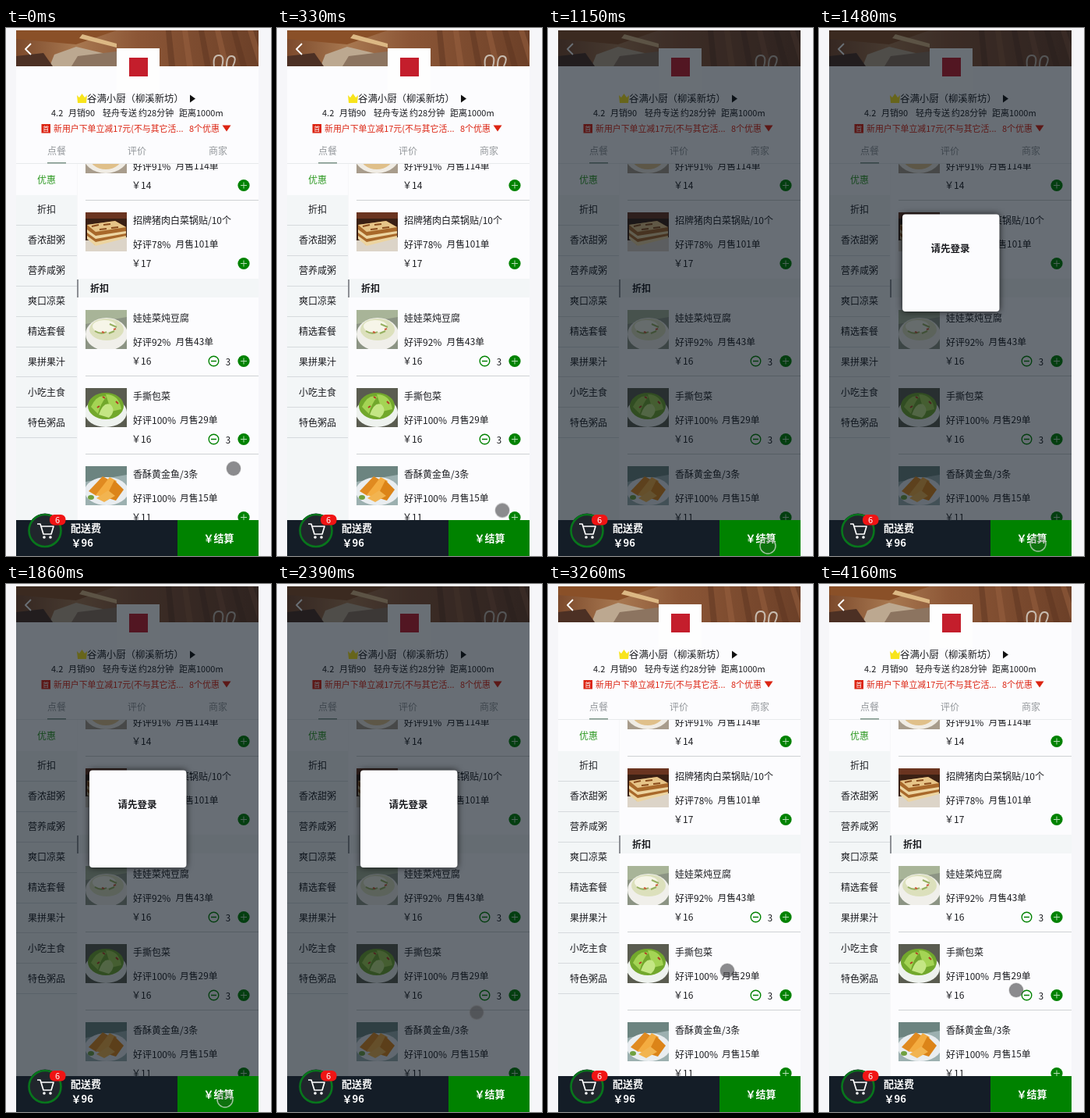
An HTML page that plays this animation: 340x676 px, repeating every 4200 ms.

```html
<!DOCTYPE html>
<html lang="zh-CN">
<head>
<meta charset="utf-8">
<title>点餐</title>
<style>
  html, body { margin: 0; width: 100%; height: 100%; overflow: hidden; background: #f6f6f9; }
  svg { display: block; }
  text { font-family: "Noto Sans CJK SC", "Noto Sans CJK", "Noto Sans", sans-serif; white-space: pre; }
  #popup { filter: drop-shadow(0 0 4px rgba(0, 0, 0, .75)); }
</style>
</head>
<body>
<svg id="stage" width="340" height="676" viewBox="0 0 340 676"></svg>
<script>
const LOOP = 4200;
const INK = '#1b1c20', GREEN = '#008200', NAVY = '#141d27', RED = '#dc2412';
const PAGE = '#f6f6f9', PALE = '#f3f6f7', WHITE = '#fcfcfe', LINE = '#d6dadd';

// y is the visual middle of the line
function text(x, y, str, { size = 12, fill = INK, weight = 400, anchor = 'start' } = {}) {
  return `<text x="${x}" y="${y + size * 0.38}" font-size="${size}" fill="${fill}" font-weight="${weight}" text-anchor="${anchor}">${str}</text>`;
}
const rect = (x, y, w, h, fill, extra = '') =>
  `<rect x="${x}" y="${y}" width="${w}" height="${h}" fill="${fill}" ${extra}/>`;
const oval = (cx, cy, rx, ry, fill, extra = '') =>
  `<ellipse cx="${cx}" cy="${cy}" rx="${rx}" ry="${ry}" fill="${fill}" ${extra}/>`;
const path = (d, fill, extra = '') => `<path d="${d}" fill="${fill}" ${extra}/>`;
const stroke = (d, color, width) =>
  path(d, 'none', `stroke="${color}" stroke-width="${width}" stroke-linejoin="round"`);
const hline = (x1, x2, y, color = LINE) => rect(x1, y, x2 - x1, 1, color);
const clip = (x, y, w, h, inner) =>
  `<svg x="${x}" y="${y}" width="${w}" height="${h}" viewBox="0 0 ${w} ${h}">${inner}</svg>`;

// Dish pictures, each on a 53 x 50 field
const dishes = {
  plate: rect(0, 0, 53, 50, '#a89c8c') + oval(26, 25, 30, 25, '#f0ece4') + oval(26, 27, 22, 18, '#e0c08a'),
  pancake: rect(0, 0, 53, 50, '#3a2014') + rect(0, 0, 53, 8, '#6a3420') +
    path('M0 36L53 32V50H0Z', '#dcd4c8') +
    path('M2 16L38 11 52 19 52 32 12 42 2 32Z', '#a8682a') +
    path('M2 16L38 11 52 19 13 25Z', '#e6c488') +
    path('M2 22L13 30 52 24V27L13 34 2 26ZM2 30L13 38 52 30V33L13 43 2 34Z', '#ecd4a0') +
    stroke('M8 18l9-2M23 16l9-1M18 22l9-1M33 20l9-1', '#8a4c1c', 2),
  soup: rect(0, 0, 53, 50, '#8c9484') + path('M0 0H53V9L0 18Z', '#a8b498') +
    oval(27, 31, 27, 21, '#f0efea') + oval(27, 25, 22, 14, '#dce0bc') + oval(24, 21, 15, 8, '#f6f5e8') +
    stroke('M12 27q8 5 15 1M31 18l9 4M30 30l7-3', '#96b060', 2) +
    stroke('M21 28l3 1M36 25l3-1', '#cc5a3c', 2),
  greens: rect(0, 0, 53, 50, '#5a5c50') + oval(26, 31, 27, 19, '#eef2ee') + oval(26, 23, 23, 17, '#72a82c') +
    path('M7 24q8-17 20-13-8 9-11 22ZM26 8q17 0 20 19l-13 3Z', '#a4d454') +
    path('M17 34q6-17 15-13 8 8-2 17Z', '#c4e684') +
    stroke('M22 11l3 2M39 17l3 3M15 25l3-2', '#b43c24', 2),
  sticks: rect(0, 0, 53, 50, '#9cb0b0') + path('M0 0H53V11L0 20Z', '#6c8480') + oval(27, 32, 28, 18, '#e9edf0') +
    path('M4 32L22 13 31 18 14 38Z', '#e08a20') + path('M13 37L31 14 40 19 27 41Z', '#f4ac40') +
    path('M26 40L37 18 49 30 39 44Z', '#dc8418') + path('M14 41L29 31 38 38 24 46Z', '#f2b450') +
    oval(7, 40, 4, 3, '#70a040')
};

const plus = y => `<circle cx="305" cy="${y}" r="7.6" fill="${GREEN}"/>` +
  stroke(`M301 ${y}h8M305 ${y - 4}v8`, '#b4dcb4', 1);
const minus = y => `<circle cx="266.5" cy="${y}" r="6.3" fill="none" stroke="${GREEN}" stroke-width="1.4"/>` +
  stroke(`M263 ${y}h7`, GREEN, 1.5);

function item({ y, kind, name, rate, sold, price, count }) {
  const row = y + 65.5;
  return clip(102, y, 53, 50, dishes[kind]) + text(163, y + 10, name) +
    text(163, y + 41, `好评${rate}%`) + text(rate < 100 ? 217.5 : 223, y + 41, `月售${sold}单`, { size: 11.8 }) +
    text(161, row, `￥${price}`) + plus(row) +
    (count ? minus(row) + text(285, row + 1, count, { size: 11.5, anchor: 'middle' }) : '');
}

function list() {
  const items = [
    { y: 136, kind: 'plate', name: '', rate: 91, sold: 114, price: 14 },
    { y: 236, kind: 'pancake', name: '招牌猪肉白菜锅贴/10个', rate: 78, sold: 101, price: 17 },
    { y: 361, kind: 'soup', name: '娃娃菜炖豆腐', rate: 92, sold: 43, price: 16, count: 3 },
    { y: 461, kind: 'greens', name: '手撕包菜', rate: 100, sold: 29, price: 16, count: 3 },
    { y: 561, kind: 'sticks', name: '香酥黄金鱼/3条', rate: 100, sold: 15, price: 11 }
  ];
  return rect(92, 174, 232, 456, WHITE) + items.map(item).join('') +
    [220, 445, 545].map(y => hline(102, 324, y, '#cfd2d4')).join('') +
    rect(92, 321, 232, 24, PALE) + rect(91, 322, 2, 23, '#8c8e94') +
    text(108, 333, '折扣', { weight: 700 });
}

function sidebar() {
  const names = ['优惠', '折扣', '香浓甜粥', '营养咸粥', '爽口凉菜', '精选套餐', '果拼果汁', '小吃主食', '特色粥品'];
  return rect(13, 174, 78, 456, PALE) + rect(13, 174, 78, 40, WHITE) +
    names.map((n, i) => {
      const y = 194 + i * 38.9;
      return text(52, y, n, { anchor: 'middle', fill: i ? INK : '#2f9a24' }) +
        (i ? hline(13, 91, Math.round(y + 19)) : '');
    }).join('');
}

function banner() {
  const slats = [...Array(6).keys()].map(i =>
    path(`M${192 + i * 21} 0h7l${5 + i * 2} 46h-8Z`, i % 2 ? '#9a6240' : '#5c3420', 'opacity=".5"')).join('');
  return clip(13, 3, 311, 46,
    `<linearGradient id="wood">
      <stop offset="0" stop-color="#7c4a2c"/><stop offset=".25" stop-color="#a87850"/>
      <stop offset=".5" stop-color="#8c5636"/><stop offset="1" stop-color="#6c4028"/></linearGradient>` +
    rect(0, 0, 311, 46, 'url(#wood)') + slats +
    path('M0 0H129L77 18 0 11Z', '#8a5028') + path('M49 31L77 21 115 30 107 46H43Z', '#bca890') +
    path('M0 33L35 29 47 46H0Z', '#4c3024') + path('M79 33L129 27V46H71Z', '#8c7460') +
    path('M85 5L129 17V22L81 10Z', '#dcb884') +
    stroke('M254 46q-2-14 6-14t4 14M270 46q0-14 7-13t1 13', '#c8bcb0', 2));
}

function header() {
  const tab = (x, label) => text(x, 157, label, { anchor: 'middle', fill: '#94989c' });
  return rect(13, 49, 311, 125, WHITE) + banner() +
    stroke('M32 20l-7 7 7 7', '#fff', 1.8) +
    rect(142, 26, 55, 56, '#fefefe') + rect(158, 38, 24, 24, '#c41e2c') +
    path('M91 86l3 3 3.5-5 3.5 5 3-3-1 10h-11Z', '#f8e41c') +
    text(104, 90.5, '谷满小厨（柳溪新坊）', { size: 12.4 }) +
    path('M236 85.5l7 5-7 5Z', '#111') +
    [[58, '4.2'], [80, '月销90'], [124, '轻舟专送'], [170, '约28分钟'], [222, '距离1000m']]
      .map(([x, s]) => text(x, 109, s, { size: 11 })).join('') +
    rect(45.5, 123, 11.5, 11.5, RED) + text(51.2, 128.8, '首', { size: 8, fill: '#fff', anchor: 'middle' }) +
    text(61, 129, '新用户下单立减17元(不与其它活...', { size: 10.9, fill: RED }) +
    text(235, 129, '8个优惠', { size: 11, fill: RED }) +
    path('M277.5 124.5h11l-5.5 8Z', RED) +
    tab(65, '点餐') + tab(168, '评价') + tab(272, '商家') +
    hline(13, 324, 173, '#e8eaec') + rect(53, 172, 24, 1.5, '#7c9488');
}

function bar() {
  const bold = { fill: '#fff', weight: 700, size: 13 };
  return rect(13, 630, 207, 46, NAVY) + rect(220, 630, 104, 46, GREEN) +
    `<circle cx="50" cy="643.5" r="22" fill="${NAVY}"/>` +
    `<circle cx="50" cy="643.5" r="20.5" fill="#20262c" stroke="#08761c" stroke-width="2.6"/>` +
    stroke('M40 635h4l4 13h10l3-10H45.5', '#fff', 1.7) +
    `<circle cx="49" cy="652" r="1.8" fill="#fff"/><circle cx="57" cy="652" r="1.8" fill="#fff"/>` +
    rect(56, 623, 20.5, 13.5, '#f01414', 'rx="6"') +
    text(66, 629.7, '6', { size: 11, fill: '#fff', anchor: 'middle' }) +
    text(83, 640.5, '配送费', bold) + text(83.5, 659.5, '￥96', bold) + text(253.5, 653.5, '￥结算', bold);
}

document.getElementById('stage').innerHTML =
  rect(0, 0, 340, 676, PAGE) + list() + sidebar() + header() +
  `<g id="shade">${rect(13, 3, 311, 627, 'rgba(7,17,27,.6)')}</g>` + bar() +
  `<g id="popup">${rect(107, 238.5, 124.5, 124.5, WHITE, 'rx="4"')}${text(143.5, 282.5, '请先登录', { size: 12.5, weight: 700 })}</g>` +
  `<g id="cursor"><circle id="dot" r="9" stroke-width="1.5"/></g>`;

// Steps are [ms, style]; the last style holds to the end of the loop
function play(id, steps, easing) {
  const frames = steps.map(([ms, style]) => ({ ...style, offset: ms / LOOP, easing }));
  frames.push({ ...steps.at(-1)[1], offset: 1 });
  document.getElementById(id).animate(frames, { duration: LOOP, iterations: Infinity });
}
const HOLD = 'steps(1, end)';
const visible = (on, off) => [[0, { opacity: 0 }], [on, { opacity: 1 }], [off, { opacity: 0 }]];
const at = (ms, x, y) => [ms, { transform: `translate(${x}px, ${y}px)` }];
const dot = (ms, r, fill, ring) => [ms, { r: `${r}px`, fill, stroke: ring }];

play('shade', visible(1100, 2715), HOLD);
play('popup', visible(1240, 2850), HOLD);
play('cursor', [
  at(0, 292, 564), at(100, 292, 566), at(520, 287, 654), at(800, 287, 654), at(1150, 282, 663),
  at(1500, 281, 660), at(1980, 281, 660), at(2140, 292, 622), at(2600, 230, 495),
  at(3270, 230, 495), at(3560, 259, 518), at(3740, 253, 520)
], 'ease-in-out');
const idle = ['rgba(70,70,72,.62)', 'rgba(110,110,112,.25)'];
play('dot', [
  dot(0, 9, ...idle),
  dot(540, 10, 'rgba(66,66,66,.62)', 'rgba(165,165,165,.9)'),
  dot(960, 10, 'rgba(50,80,50,.3)', 'rgba(180,205,180,.9)'),
  dot(2060, 9, ...idle)
], HOLD);
</script>
</body>
</html>
```
